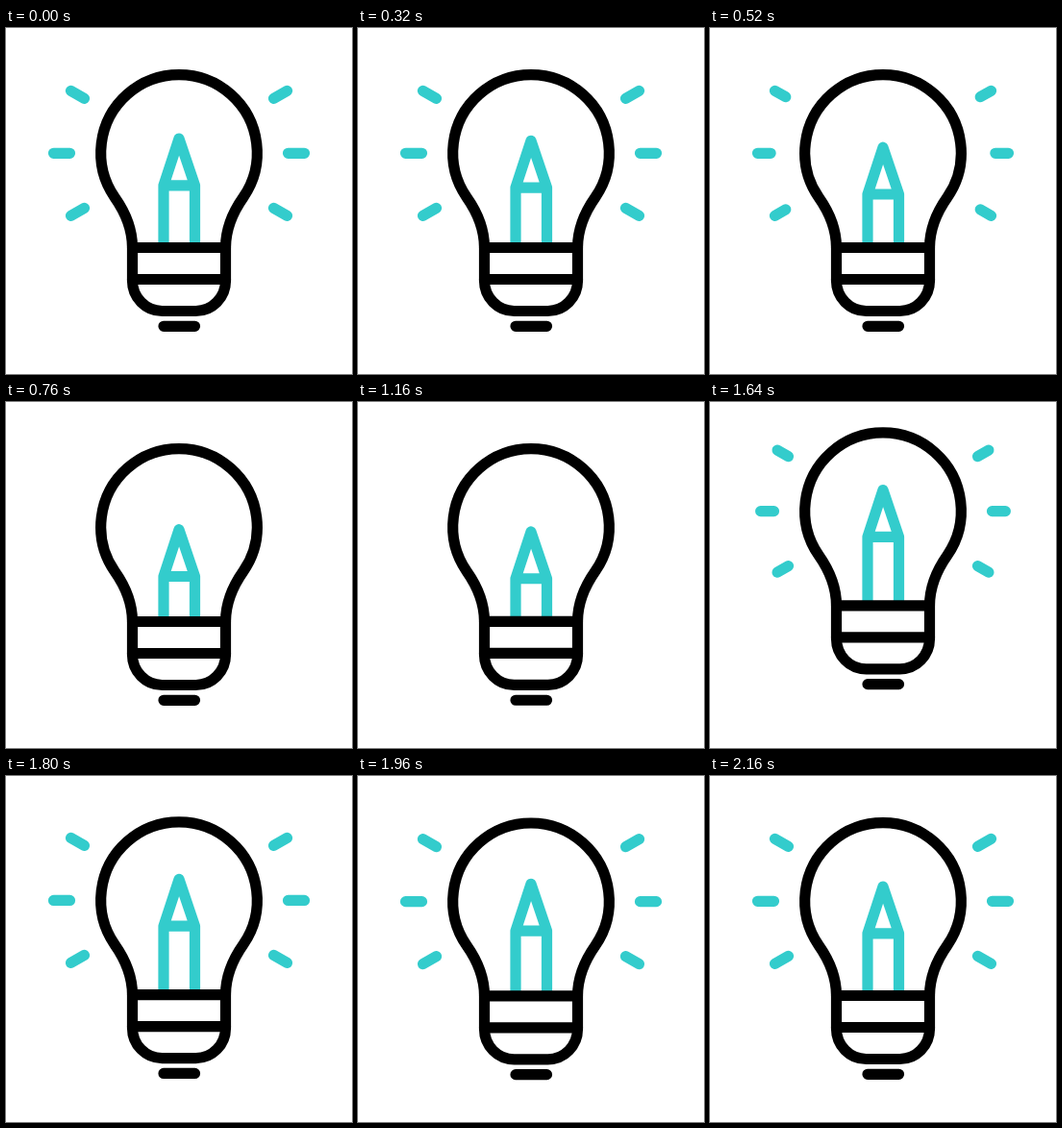
An HTML page that plays this animation: 360 by 360 pixels, repeating every 2.28 s.

```html
<!DOCTYPE html>
<html lang="en">
<head>
<meta charset="utf-8">
<title>Idea</title>
<style>
  html, body { margin: 0; width: 100%; height: 100%; overflow: hidden; background: #fff; }
  svg { display: block; width: 100%; height: 100%; }
  g { fill: none; stroke-width: 11.2; stroke-linecap: round; stroke-linejoin: round; }
  .accent { stroke: #33cccc; }
  .ink { stroke: #000; }
</style>
</head>
<body>
<svg viewBox="0 0 360 360">
  <g id="lamp">
    <g class="accent">
      <path id="rays"/>
      <path id="pencil"/>
    </g>
    <g class="ink">
      <path d="M131.5 228.5C131.5 210 125 193 113 176A81.3 81.3 0 1 1 247 176C235 193 228.5 210 228.5 228.5V263A31 31.5 0 0 1 197.5 294.5H162.5A31 31.5 0 0 1 131.5 263Z"/>
      <path d="M131.5 228.5H228.5M131.5 261.5H228.5M164 310.3H196.5"/>
    </g>
  </g>
</svg>
<script>
const LOOP = 2280, STEP = 40;
const lamp = document.getElementById('lamp');
const rays = document.getElementById('rays');
const pencil = document.getElementById('pencil');

// Left-hand rays: inner x, inner y, outer x, outer y
const RAYS = [[81.5, 73.3, 67.5, 65.3], [66.5, 130.3, 49.5, 130.3], [81.5, 187.3, 67.5, 195.3]];

const part = (t, from, to) => Math.min(1, Math.max(0, (t - from) / (to - from)));
const smooth = u => u * u * (3 - 2 * u);
const easeOut = u => 1 - (1 - u) * (1 - u);
const move = (t, from, to) => smooth(part(t, from, to));

// Jump up, land slightly low, settle
function lampY(t) {
  const rise = smooth(part(t, 1120, 1640) ** 1.35);
  return -16.7 * rise + 17.7 * move(t, 1640, 1840) - move(t, 1840, 2040);
}

// Sink into the socket, spring out, settle
function pencilY(t) {
  return 20 * move(t, 160, 920) - 28 * move(t, 1360, 1680) + 8 * move(t, 1680, 2160);
}

// Both ends run from the inside outwards
function rayPath(t) {
  const back = t >= 1480;
  const a = back ? 0 : move(t, 440, 720);
  const b = back ? easeOut(part(t, 1480, 1760)) : 1;
  if (b - a < 0.001) return '';
  return RAYS.map(([x0, y0, x1, y1]) => {
    const at = u => [x0 + (x1 - x0) * u, y0 + (y1 - y0) * u];
    const p = at(a), q = at(b);
    return `M${p}L${q}M${360 - p[0]} ${p[1]}L${360 - q[0]} ${q[1]}`;
  }).join('');
}

function pencilPath(y) {
  const tip = 115 + y, collar = 163.8 + y;
  return `M164 226V${collar}L180 ${tip}L196.5 ${collar}V226M164 ${collar}H196.5`;
}

function draw(time) {
  const t = Math.floor((time % LOOP) / STEP) * STEP;
  lamp.setAttribute('transform', `translate(0 ${lampY(t)})`);
  rays.setAttribute('d', rayPath(t));
  pencil.setAttribute('d', pencilPath(pencilY(t)));
}

const start = performance.now();
function tick() {
  draw(performance.now() - start);
  requestAnimationFrame(tick);
}
tick();
</script>
</body>
</html>
```
